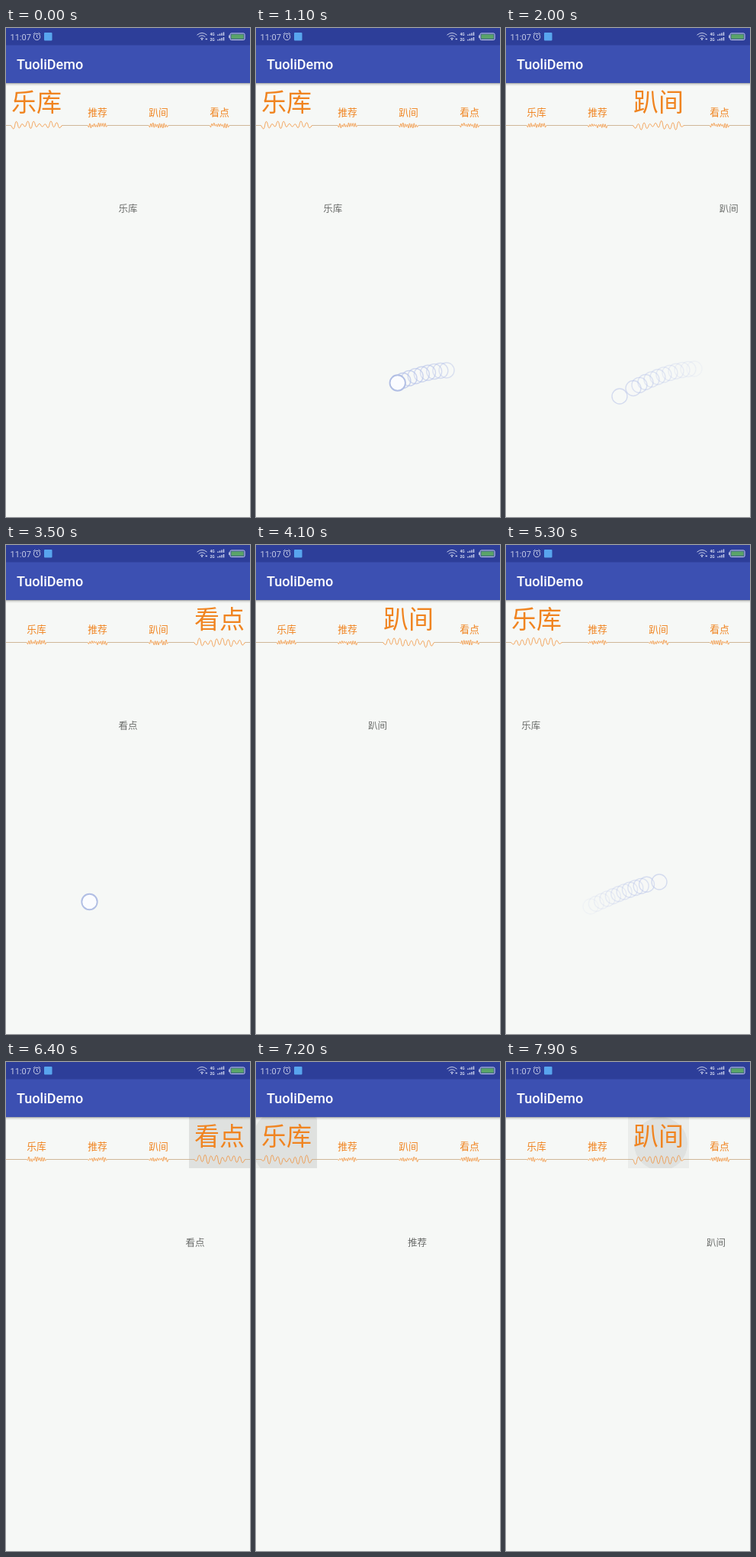
Animation of 320x640 px, one loop 8000 ms. Source, as an HTML page:

```html
<!DOCTYPE html>
<html lang="zh">
<head>
<meta charset="utf-8">
<title>TuoliDemo</title>
<style>
  html, body { margin: 0; width: 100%; height: 100%; overflow: hidden; background: #f6f8f6; }
  svg { display: block; width: 320px; height: 640px; }
  .cjk { font-family: "Noto Sans CJK SC", "Noto Sans CJK", "Noto Sans CJK JP", sans-serif; text-anchor: middle; }
  .ui { font-family: Roboto, sans-serif; }
  .tab { fill: #f08420; }
  .page { fill: #6b6d6b; font-size: 12.5px; }
  .wave { fill: none; stroke: #f08a2c; stroke-width: .75; }
  .rail { fill: none; stroke: #cbb08e; stroke-width: .9; }
  .icon { fill: none; stroke: #c9cfea; stroke-width: 1; }
</style>
</head>
<body>
<svg id="stage" viewBox="0 0 320 640">
  <defs>
    <linearGradient id="shade" x2="0" y2="1">
      <stop offset="0" stop-color="#000" stop-opacity=".36"/>
      <stop offset=".4" stop-color="#000" stop-opacity=".12"/>
      <stop offset="1" stop-color="#000" stop-opacity="0"/>
    </linearGradient>
    <clipPath id="cell"><rect id="cellBox" y="72" width="80" height="67"/></clipPath>
  </defs>
  <rect width="320" height="640" fill="#f6f8f6"/>
  <g id="ripple" clip-path="url(#cell)">
    <rect id="press" y="72" width="80" height="67"/>
    <circle id="ink" cy="107"/>
  </g>
  <g id="pages"></g>
  <g id="tabs"></g>
  <g id="touch"></g>

  <rect y="72" width="320" height="4" fill="url(#shade)"/>
  <rect y="22" width="320" height="50" fill="#3c50b2"/>
  <rect width="320" height="22.5" fill="#2d3e99"/>
  <text class="ui" x="14" y="54" font-size="18" font-weight="500" fill="#fff">TuoliDemo</text>

  <text class="ui" x="5.5" y="15.5" font-size="11" fill="#c3c9e6">11:07</text>
  <g class="icon">
    <circle cx="40.5" cy="11.5" r="4.2"/>
    <path d="M40.5 8.8V11.7L42 13M35.8 8.2L38.3 6M45.2 8.2L42.7 6"/>
    <path d="M250.5 9.2Q257 3.8 263.5 9.2M252.7 11.6Q257 8 261.3 11.6M254.9 13.8Q257 12 259.1 13.8"/>
    <path d="M261.5 14.5h2.5" stroke-width="1.5"/>
  </g>
  <circle cx="257" cy="15" r="1" fill="#c9cfea"/>
  <rect x="50" y="6" width="10.5" height="10.5" rx="1" fill="#58a5ee"/>
  <g class="ui" font-size="5" font-weight="700" fill="#d5daf0">
    <text x="267.5" y="10">4G</text><text x="267.5" y="16.5">2G</text>
  </g>
  <path id="signal" stroke="#d0d6ee" stroke-width="1.4"/>
  <rect x="294" y="7" width="19" height="8.6" rx="1.5" fill="none" stroke="#d0d6ee"/>
  <rect x="295.3" y="8.3" width="16.4" height="6" fill="#5aa469"/>
  <rect x="292.2" y="9.5" width="1.4" height="3.6" fill="#d0d6ee"/>
</svg>
<script>
const LOOP = 8000, STEP = 100, WIDTH = 320, RAIL = 127.5;
const NAMES = ['乐库', '推荐', '趴间', '看点'];

// Each move: the time the tab becomes selected, the tab, and a swipe path or a tap.
const MOVES = [
  { at: 0, to: 0 },
  { at: 1150, to: 1, swipe: [250, 448, 150, 483] },
  { at: 1938, to: 2, swipe: [247, 446, 149, 482] },
  { at: 2900, to: 3, swipe: [250, 440, 150, 466] },
  { at: 3680, to: 2, swipe: [109.5, 467, 200, 440] },
  { at: 4520, to: 1, swipe: [110, 467, 200, 438] },
  { at: 5234, to: 0, swipe: [111, 473, 201, 441] },
  { at: 6248, to: 3, press: 6180 },
  { at: 7110, to: 0, press: 7060 },
  { at: 7813, to: 2, press: 7800 }
];
MOVES.forEach((m, i) => m.from = i ? MOVES[i - 1].to : m.to);

const DRAG = 140, HOLD = 60, PULL = .2875, SETTLE = 600;
const DOTS = 12, FADE = 240;
const $ = id => document.getElementById(id);
const clamp = v => Math.max(0, Math.min(1, v));

function add(parent, tag, attrs) {
  const el = document.createElementNS('http://www.w3.org/2000/svg', tag);
  set(el, attrs);
  return parent.appendChild(el);
}
function set(el, attrs) {
  for (const key in attrs) el.setAttribute(key, attrs[key]);
}
function random(seed) {
  return () => {
    seed = (seed * 16807 + 11) % 2147483647;
    return seed / 2147483647;
  };
}

const rail = add($('tabs'), 'path', { class: 'rail' });
const tabs = NAMES.map(name => {
  const wave = add($('tabs'), 'path', { class: 'wave' });
  const label = add($('tabs'), 'text', { class: 'cjk tab' });
  label.textContent = name;
  return { wave, label };
});
NAMES.forEach((name, i) => {
  add($('pages'), 'text', { class: 'cjk page', x: 160 + i * WIDTH, y: 241 }).textContent = name;
});
const dots = Array.from({ length: DOTS }, () =>
  add($('touch'), 'circle', { r: 10, fill: '#fff', 'fill-opacity': .15, stroke: '#b4c0e8', 'stroke-width': 1.4 }));
const finger = add($('touch'), 'circle', { r: 10.2, fill: '#fbfcff', stroke: '#b1bee4', 'stroke-width': 1.9 });

let bars = '';
for (const base of [10, 16.5])
  for (let i = 0; i < 4; i++) bars += `M${278 + i * 2.5} ${base}v${-1.5 - i}`;
set($('signal'), { d: bars });

function wavePath(center, half, seed, big) {
  const next = random(seed * 7919 + 101), count = 18, dx = half * 2 / count;
  for (let i = 0; i < 4; i++) next();
  let x = center - half, y = RAIL, d = `M${x} ${y}`;
  for (let i = 1; i <= count; i++) {
    const size = big ? 1.5 + next() * 5 : .6 + next() * 3;
    const last = y, mid = x + dx / 2;
    y = i === count ? RAIL : RAIL + (i % 2 ? 1 : -1) * size;
    x += dx;
    d += `C${mid} ${last} ${mid} ${y} ${x} ${y}`;
  }
  return d;
}

function scrollAt(t) {
  let pos = 0;
  for (const m of MOVES) {
    const span = m.to - m.from;
    if (m.swipe) {
      if (t < m.at - DRAG) break;
      const pull = PULL * clamp((t - m.at + DRAG) / DRAG);
      const rest = (1 - clamp((t - m.at) / SETTLE)) ** 5;
      pos = m.from + span * (t < m.at ? pull : 1 - (1 - PULL) * rest);
    } else {
      if (t < m.at) break;
      const time = (Math.abs(span) + 1) * 100;
      pos = m.to - span * (1 - clamp((t - m.at) / time)) ** 5;
    }
  }
  return pos;
}

function pointOn([x0, y0, x1, y1], u) {
  const lift = x1 < x0 ? u ** 1.7 : 1 - (1 - u) ** 1.35;
  return { cx: x0 + (x1 - x0) * u, cy: y0 + (y1 - y0) * lift };
}

function drawTabs(t) {
  const past = MOVES.filter(m => m.at <= t);
  const current = past[past.length - 1].to;
  let line = '', edge = 0;
  tabs.forEach(({ wave, label }, i) => {
    const center = 40 + i * 80, big = i === current, half = big ? 34 : 13;
    // A wave is redrawn only when its own tab gains or loses the selection.
    const turn = past.reduce((last, m, n) => m.to === i || m.from === i ? n : last, 0);
    set(wave, { d: wavePath(center, half, turn * 4 + i + 1, big) });
    set(label, { x: center, y: big ? 108.5 : 114.6, 'font-size': big ? 33 : 12.8 });
    line += `M${edge} ${RAIL}H${center - half}`;
    edge = center + half;
  });
  set(rail, { d: line + `M${edge} ${RAIL}H${WIDTH}` });
}

function drawTouch(t) {
  const m = MOVES.find(m => m.swipe && t >= m.at - DRAG - HOLD && t < m.at + FADE);
  set($('touch'), { opacity: m ? 1 : 0 });
  if (!m) return;
  const start = m.at - DRAG;
  dots.forEach((dot, i) => {
    const part = i / (DOTS - 1), age = t - start - part * DRAG;
    const u = i === DOTS - 1 ? 1 : i / DOTS * .98;
    set(dot, { ...pointOn(m.swipe, u), opacity: age < 0 ? 0 : .7 * clamp(1 - age / FADE) });
  });
  set(finger, { ...pointOn(m.swipe, clamp((t - start) / DRAG)), opacity: t < m.at ? 1 : 0 });
}

function drawRipple(t) {
  const m = MOVES.filter(m => m.press <= t).pop();
  const age = m ? t - m.press : LOOP;
  const fade = 1 - clamp((age - 300) / 540);
  set($('ripple'), { opacity: fade });
  if (!m) return;
  const x = m.to * 80;
  set($('cellBox'), { x });
  set($('press'), { x, 'fill-opacity': .045 * clamp(age / 80) });
  set($('ink'), { cx: x + 43, r: Math.min(90, age * .35), 'fill-opacity': .05 });
}

function draw(now) {
  const t = Math.floor(now % LOOP / STEP) * STEP;
  set($('pages'), { transform: `translate(${-scrollAt(t) * WIDTH} 0)` });
  drawTabs(t);
  drawTouch(t);
  drawRipple(t);
}

const began = performance.now();
function tick() {
  draw(performance.now() - began);
  requestAnimationFrame(tick);
}
tick();
</script>
</body>
</html>
```
